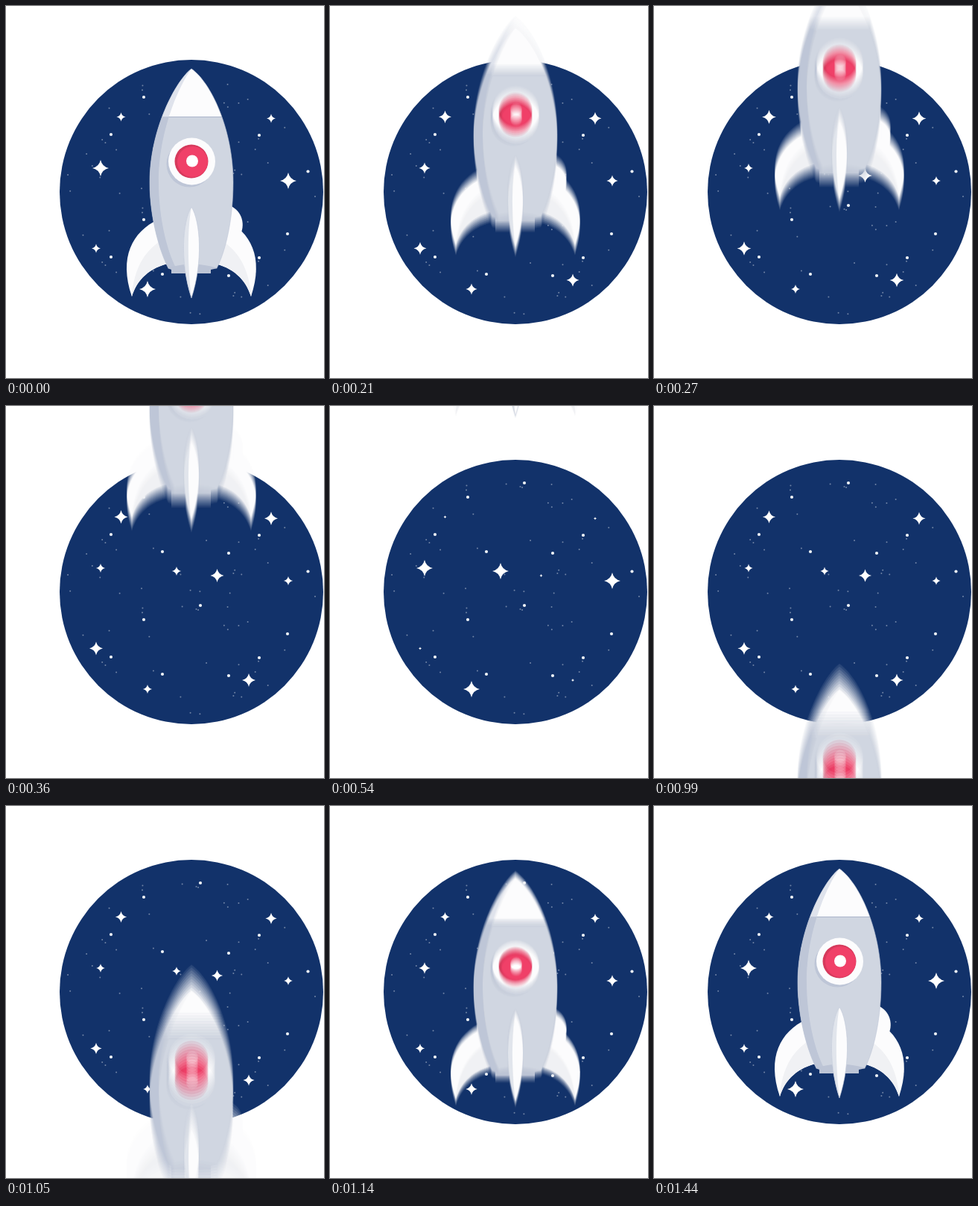
These frames come from a looping animation (427 by 498 pixels, 1500 ms). An HTML page with a canvas:

```html
<!DOCTYPE html>
<html lang="en">
<head>
<meta charset="utf-8">
<title>Rocket</title>
<style>
  html, body { margin: 0; width: 100%; height: 100%; overflow: hidden; background: #fff; }
  canvas { display: block; width: 427px; height: 498px; }
</style>
</head>
<body>
<canvas id="stage" width="427" height="498"></canvas>
<script>
const W = 427, H = 498, LOOP = 1500, STEP = 30;
const SHUTTER = 16, SAMPLES = 10;
const DISC = { x: 249, y: 249, r: 177 };
const NAVY = '#12326a', WHITE = '#fcfcfd', GREY = '#d0d6e1', SHADE = '#bec6d7';
const ctx = document.getElementById('stage').getContext('2d');

const smooth = x => {
  x = Math.min(1, Math.max(0, x));
  return x * x * (3 - 2 * x);
};
const pulse = (t, center, width) => smooth(1 - Math.abs(t - center) / width);

function layer() {
  const canvas = document.createElement('canvas');
  canvas.width = W;
  canvas.height = H;
  return canvas;
}

function fill(g, color, d) {
  g.fillStyle = color;
  g.fill(new Path2D(d));
}

function dot(g, color, x, y, r) {
  g.fillStyle = color;
  g.beginPath();
  g.arc(x, y, r, 0, Math.PI * 2);
  g.fill();
}

function seeded(seed) {
  return () => (seed = (seed * 16807) % 2147483647) / 2147483647;
}

// The star field is one band of stars, repeated once below.
function buildSky() {
  const sky = layer(), g = sky.getContext('2d'), rand = seeded(77), band = 164;
  const bright = [[261, 103], [185, 122], [141, 172], [340, 173], [210, 195], [299, 197]];
  g.fillStyle = '#fff';
  g.fillRect(0, 0, W, H);
  dot(g, NAVY, DISC.x, DISC.y, DISC.r);

  const scatter = (color, x, y, r) => {
    for (const sy of [y, y + band]) {
      if (Math.hypot(x - DISC.x, sy - DISC.y) < DISC.r - 8) dot(g, color, x, sy, r);
    }
  };
  for (let i = 0; i < 48; i++) {
    scatter('rgba(255,255,255,.4)', 75 + 350 * rand(), 85 + band * rand(), 1);
  }
  for (const [x, y] of bright) scatter('#f0f4f8', x, y, 2.1);
  dot(g, '#f0f4f8', 405.5, 221.5, 2.1);
  dot(g, '#f0f4f8', 378, 305, 2.1);
  return sky;
}

function sideFin(g) {
  const fin = 'M204 286C170 302 151 336 169 389C176 366 193 350 221 344Z';
  fill(g, WHITE, fin);
  g.save();
  g.clip(new Path2D(fin));
  fill(g, '#f0f1f4', 'M208 314C184 330 172 352 168 392L225 392L225 314Z');
  g.restore();
}

function buildRocket() {
  const sprite = layer(), g = sprite.getContext('2d');
  const body = new Path2D('M249 84C228 100 193 165 193 236C193 285 207 330 218 351L283 351' +
    'C295 328 305 285 305 236C305 165 275 102 249 84Z');
  const side = new Path2D('M249 84C234 104 205 165 205 236C205 285 217 330 229 352H180V84Z');
  const seam = 148.5;
  const twoTone = (nose, hull) => {
    g.fillStyle = nose;
    g.fillRect(180, 80, 130, seam - 80);
    g.fillStyle = hull;
    g.fillRect(180, seam, 130, 210);
  };

  // Fins behind the hull
  fill(g, WHITE, 'M296 266C312 269 322 286 316 303L296 304Z');
  sideFin(g);
  g.save();
  g.translate(2 * DISC.x, 0);
  g.scale(-1, 1);
  sideFin(g);
  g.restore();

  // Hull and nozzle
  g.save();
  g.clip(body);
  twoTone(WHITE, GREY);
  g.clip(side);
  twoTone('#dfe3ec', SHADE);
  g.restore();
  g.strokeStyle = 'rgba(190,198,215,.6)';
  g.stroke(body);
  fill(g, '#bcc4d5', 'M217 351Q249 340 284 351L275 353V358H222V353Z');

  // Porthole
  dot(g, SHADE, 246.5, 211.5, 31);
  dot(g, WHITE, 249.5, 208, 31.5);
  dot(g, '#d63a5c', 249, 208, 22.5);
  dot(g, '#f04068', 250.5, 208.5, 20.5);
  dot(g, '#fff', 250, 207.5, 8);

  // Middle fin
  const fin = 'M249 269C261 288 265 342 249 391C233 342 237 288 249 269Z';
  fill(g, WHITE, fin);
  fill(g, '#e1e5ec', 'M249 269C237 288 233 342 249 391C244 350 243 300 249 269Z');
  g.stroke(new Path2D(fin));
  return sprite;
}

const sky = buildSky();
const rocket = buildRocket();
const scene = layer();
const sceneCtx = scene.getContext('2d');

// Leaves through the top, then returns from below.
function offset(t) {
  return t < 585
    ? -380 * smooth((t - 88) / 475)
    : 420 * (1 - smooth((t - 881) / 280));
}

const twinkles = [
  {
    at: [[127, 217], [379, 234], [190, 379], [229, 221]],
    size: t => 11 - 5.5 * (pulse(t, 310, 240) + pulse(t, 1010, 300))
  },
  {
    at: [[154.5, 148.5], [356, 150.5], [121, 324.5], [326, 367], [283.5, 227]],
    size: t => 6 + 3.5 * pulse(t, 300, 250) - 4 * pulse(t, 555, 195) + 3 * pulse(t, 930, 250)
  }
];

function drawTwinkle(g, x, y, r) {
  const k = r * 0.18;
  g.beginPath();
  g.moveTo(x, y - r);
  g.quadraticCurveTo(x + k, y - k, x + r, y);
  g.quadraticCurveTo(x + k, y + k, x, y + r);
  g.quadraticCurveTo(x - k, y + k, x - r, y);
  g.quadraticCurveTo(x - k, y - k, x, y - r);
  g.fill();
}

function drawScene(t, y) {
  sceneCtx.drawImage(sky, 0, 0);
  sceneCtx.fillStyle = '#fff';
  for (const { at, size } of twinkles) {
    for (const [x, sy] of at) drawTwinkle(sceneCtx, x, sy, size(t));
  }
  sceneCtx.drawImage(rocket, 0, y);
}

// Motion blur: a running average of whole scenes while the shutter is open.
function render(now) {
  const t = Math.floor((now % LOOP) / STEP) * STEP;
  for (let i = 0; i < SAMPLES; i++) {
    drawScene(t, offset(t + SHUTTER * (i / (SAMPLES - 1) - 0.5)));
    ctx.globalAlpha = 1 / (i + 1);
    ctx.drawImage(scene, 0, 0);
  }
}

const start = performance.now();
function tick() {
  render(performance.now() - start);
  requestAnimationFrame(tick);
}
tick();
</script>
</body>
</html>
```
